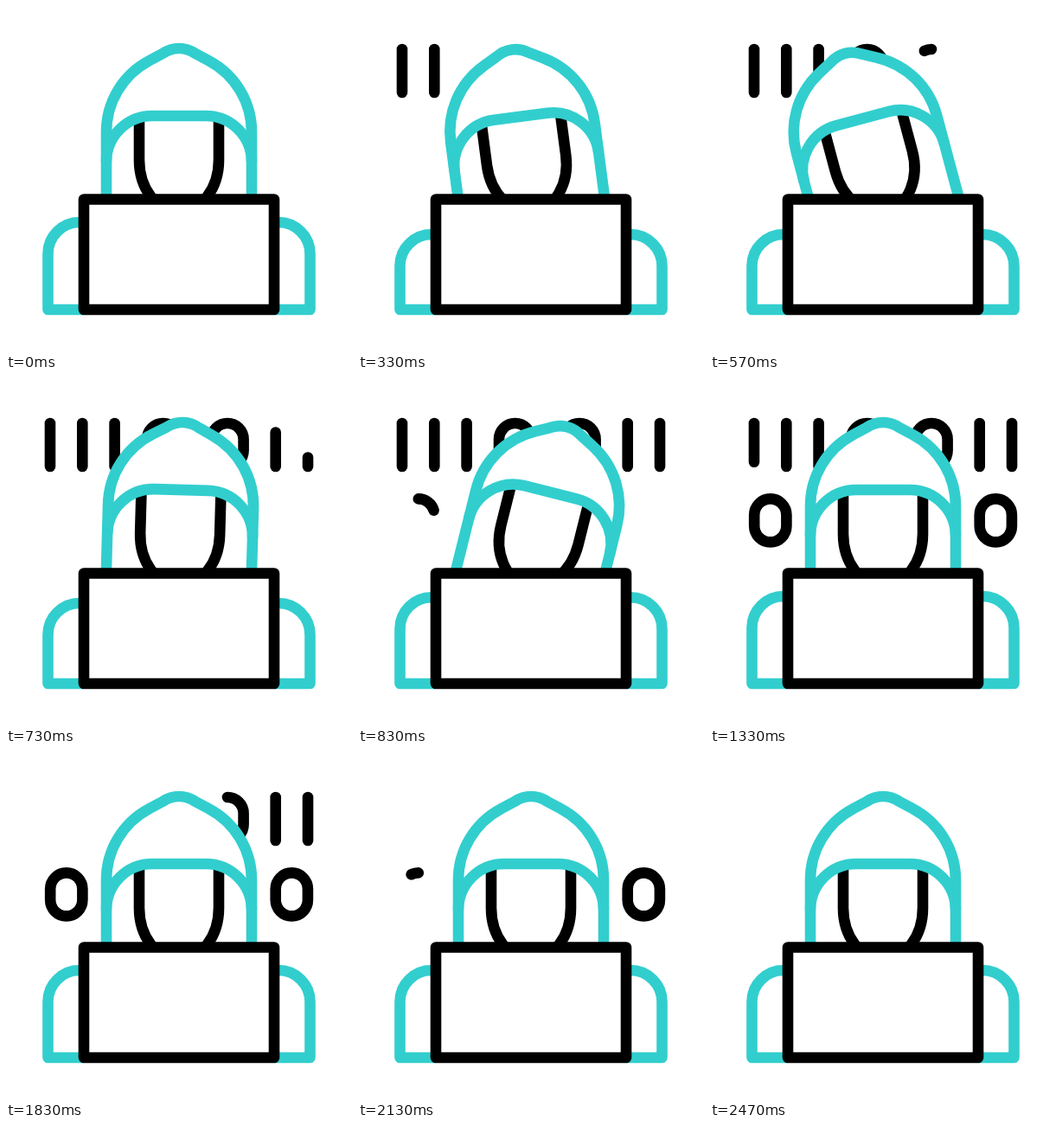
An HTML page for the animation above (2500 ms loop, 400x400 px).

```html
<!DOCTYPE html>
<html lang="en">
<head>
<meta charset="utf-8">
<title>Hooded figure</title>
<style>
  html, body { margin: 0; width: 100%; height: 100%; overflow: hidden; background: #fff; }
  svg { display: block; width: 100%; height: 100%; }
  path { fill: none; stroke: #000; stroke-width: 12.6; stroke-linejoin: round; }
  .teal { stroke: #32cece; }
  .solid { fill: #fff; }
  #digits path { stroke-linecap: round; }
</style>
</head>
<body>
<svg viewBox="0 0 400 400">
  <g id="digits"></g>
  <path class="teal" id="shoulders"/>
  <g id="head">
    <path class="teal solid" d="M116 260V146C116 112 134 80 166 63L181 55Q190 49 200 49T219 55L234 63C266 80 284 112 284 146V260"/>
    <path d="M154 127V178A46 60 0 0 0 246 178V127"/>
    <path class="teal" d="M116 180A53 53 0 0 1 169 127H231A53 53 0 0 1 284 180"/>
  </g>
  <path class="solid" d="M90 223.5H310V351H90Z"/>
</svg>
<script>
const LOOP = 2500, STEP = 50;   // motion runs at 20 steps per second
const DRAW = 2.7, HOLD = 24.4;  // in steps
const byId = id => document.getElementById(id);

const ease = (t, from, to) => {
  const p = Math.min(1, Math.max(0, (t - from) / (to - from)));
  return p * p * (3 - 2 * p);
};

const bar = x => `M${x} 100V50`;
const zero = (x, y, dir) => {
  const r = 18.6, sweep = dir > 0 ? 1 : 0;
  const arc = (dx, dy) => `a${r} ${r} 0 0 ${sweep} ${dx * dir} ${dy}`;
  return `M${x} ${y}${arc(r, r)}v12.8${arc(-2 * r, 0)}v-12.8${arc(r, -r)}`;
};

// Each digit: shape and the step at which it starts to be written
const digits = [
  [bar(51), 1.06], [bar(88.3), 3], [bar(125.6), 5.4],
  [zero(181.6, 50, -1), 8], [zero(256, 50, -1), 10.6],
  [bar(311.7), 12.1], [bar(349), 13.2],
  [zero(69.8, 137.4, 1), 15.3], [zero(330.3, 137.4, 1), 18.3]
].map(([d, start]) => {
  const path = document.createElementNS("http://www.w3.org/2000/svg", "path");
  path.setAttribute("d", d);
  path.setAttribute("pathLength", 1);
  byId("digits").append(path);
  return { path, start };
});

function render(t) {
  for (const { path, start } of digits) {
    const end = ease(t, start, start + DRAW);
    const begin = ease(t, start + HOLD, start + HOLD + DRAW);
    path.style.display = end > begin ? "" : "none";
    path.setAttribute("stroke-dasharray", `${end - begin} 2`);
    path.setAttribute("stroke-dashoffset", -begin);
  }

  const tilt = -15 * ease(t, 1, 11) + 30 * ease(t, 11, 16.6) - 15 * ease(t, 16.6, 25);
  byId("head").setAttribute("transform", `rotate(${tilt} 200 219)`);

  const y = 250 + 14 * (ease(t, 0, 5.5) - ease(t, 11.5, 17));
  byId("shoulders").setAttribute("d",
    `M90 ${y}H85A36.5 36.5 0 0 0 48.5 ${y + 36.5}V351H90` +
    `M310 ${y}H315A36.5 36.5 0 0 1 351.5 ${y + 36.5}V351H310`);
}

function tick() {
  const ms = performance.now() % LOOP;
  render(Math.max(0, Math.floor((ms - 20) / STEP)));
  requestAnimationFrame(tick);
}
tick();
</script>
</body>
</html>
```
